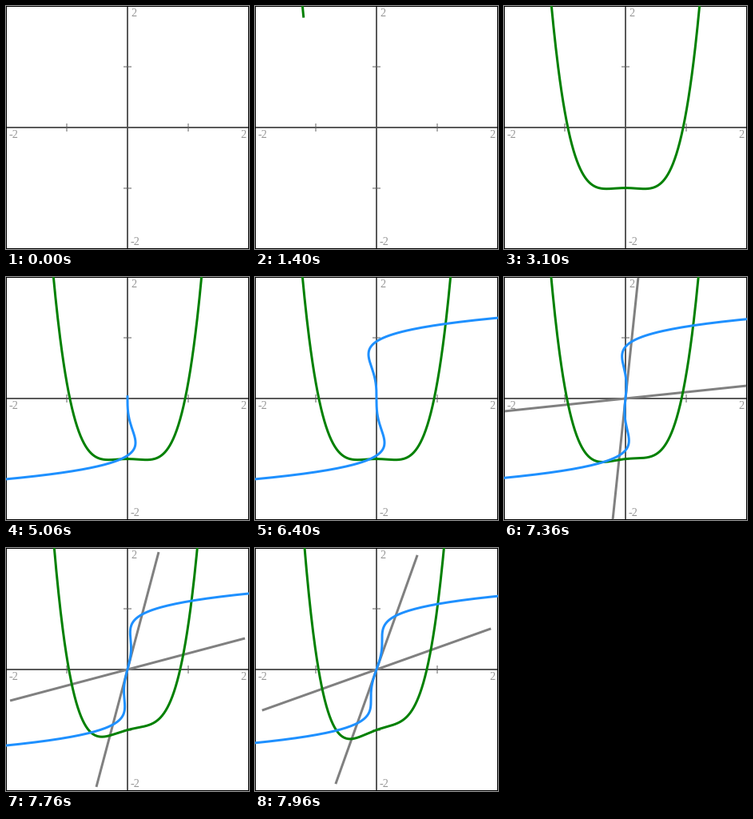
A matplotlib script that plays this animation: 304 by 304 pixels, repeating every 8 s.

```python
import numpy as np
import matplotlib.pyplot as plt
from matplotlib.animation import FuncAnimation

SIZE, DPI = 304, 100
UNIT, MID = 76, 152
STEP_MS, LOOP_MS = 20, 8000
PX = 72 / DPI  # points per pixel

fig = plt.figure(figsize=(SIZE / DPI, SIZE / DPI), dpi=DPI, facecolor="white")
ax = fig.add_axes([0, 0, 1, 1])
ax.set_xlim(0, SIZE)
ax.set_ylim(SIZE, 0)
ax.axis("off")


def line(x, y, color, width, z):
    return ax.plot(x, y, color=color, lw=width * PX, zorder=z, snap=False,
                   solid_capstyle="butt", solid_joinstyle="round")[0]


def label(x, y, text):
    ax.text(x, y, text, family="Liberation Serif", fontsize=14.3 * PX,
            color="#969696", ha="left", va="baseline", zorder=1)


def place(artist, x, y):
    artist.set_data(MID + UNIT * x, MID - UNIT * y)


# Coordinate frame
for p in (MID - UNIT, MID, MID + UNIT):
    line([p, p], [MID - 5, MID + 5], "#606060", 1, 3)
    line([MID - 5, MID + 5], [p, p], "#606060", 1, 3)
line([MID, MID], [0, SIZE], "black", 1.3, 2)
line([0, SIZE], [MID, MID], "black", 1.3, 2)
line([0, SIZE, SIZE, 0, 0], [0, 0, SIZE, SIZE, 0], "black", 2, 2)
label(156, 13, "2")
label(156, 299, "-2")
label(4, 165, "-2")
label(293.5, 165, "2")

rods = [line([], [], "#808080", 3, 4) for _ in range(2)]
green = line([], [], "#008000", 3, 5)
blue = line([], [], "#1e90ff", 3, 6)


def even_curve(u):
    return 1.56 * u**4 - 0.3 * u**2 - 0.995


def odd_curve(v):
    return 0.97 * v**5 - 0.855 * v**3


def traced(t, start, pace, first, last):
    """Parameter values drawn so far, growing by 0.1 per step."""
    if t < start:
        return np.array([])
    tip = min(first + 0.1 * int((t - start) / pace), last)
    return np.linspace(first - 0.2, tip, 300)


def tilt(t):
    n = max(0, int((t - 7060) / 50))
    return np.radians(0.957 * n + 0.0075 * n * n)


def draw(i):
    t = i * STEP_MS + STEP_MS / 2
    a = tilt(t)
    c, s = np.cos(a), np.sin(a)

    # Each curve is sheared along with its own axis
    u = traced(t, 1400, 48.5, -1.2, 1.4)
    place(green, u * c, even_curve(u) + u * s)
    v = traced(t, 4360, 50, -1.35, 1.45)
    place(blue, odd_curve(v) + v * s, v * c)

    r = np.array([-2, 2]) if t >= 7060 else np.array([])
    place(rods[0], r * c, r * s)
    place(rods[1], r * s, r * c)
    return [green, blue, *rods]


anim = FuncAnimation(fig, draw, frames=LOOP_MS // STEP_MS, interval=STEP_MS,
                     repeat=True, repeat_delay=0, blit=False)
plt.show()
```
